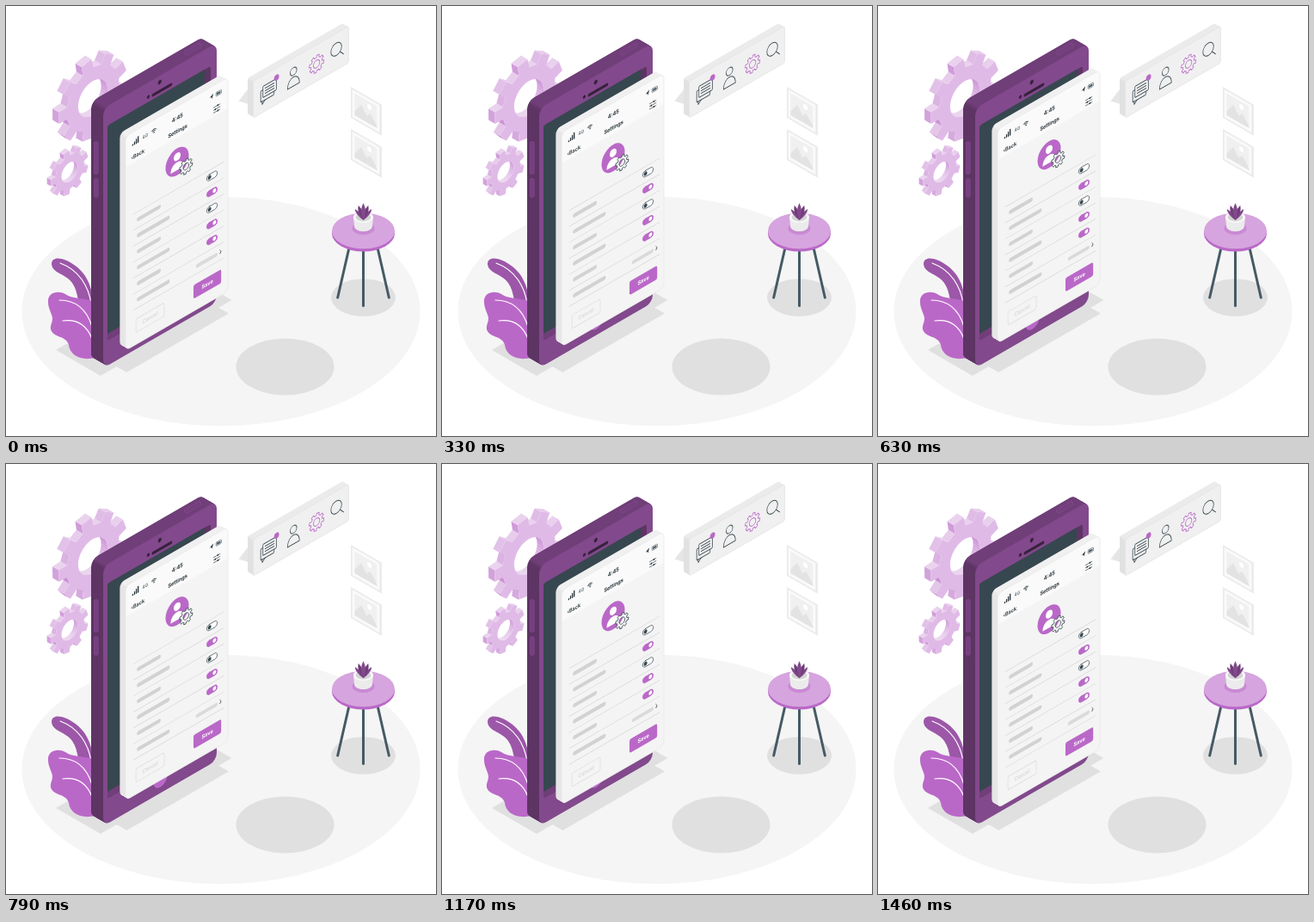
An HTML page with a canvas for the animation above (1500 ms loop, 500 by 500 pixels).

```html
<!DOCTYPE html>
<html lang="en">
<head>
<meta charset="utf-8">
<title>Phone settings</title>
<style>
  html, body { margin: 0; width: 100%; height: 100%; overflow: hidden; background: #fff; }
  canvas { display: block; width: 100vw; height: 100vh; }
</style>
</head>
<body>
<canvas id="stage" width="500" height="500"></canvas>
<script>
const ctx = document.getElementById('stage').getContext('2d');
const LOOP = 1500, LIFT = 10, TAU = Math.PI * 2;
const COS = Math.cos(Math.PI / 6), SLOPE = Math.tan(Math.PI / 6);
const PURPLE = '#ba68c8', FRONT = '#82498c', TOP = '#703e78', SIDE = '#5d3464';
const INK = '#263238', SLATE = '#37474f', GREY = '#e0e0e0';
const FONT = 'Inter, "Open Sans", sans-serif';
const range = n => [...Array(n).keys()];

// Isometric planes: a wall rises (-1) or falls (1) to the right.
function plane(a, b, c, d, x, y, draw) {
  ctx.save();
  ctx.transform(a, b, c, d, x, y);
  draw();
  ctx.restore();
}
const wall = (x, y, dir, draw) => plane(COS, dir / 2, 0, 1, x, y, draw);
const ground = (x, y, draw) => plane(COS, -0.5, COS, 0.5, x, y, draw);

function fill(color, path, rule = 'nonzero') {
  ctx.beginPath();
  path();
  ctx.fillStyle = color;
  ctx.fill(rule);
}

function stroke(color, width, path) {
  ctx.beginPath();
  path();
  ctx.strokeStyle = color;
  ctx.lineWidth = width;
  ctx.lineCap = ctx.lineJoin = 'round';
  ctx.stroke();
}

const line = (...pts) => () => pts.forEach(([x, y], i) => i ? ctx.lineTo(x, y) : ctx.moveTo(x, y));
const poly = (...pts) => () => { line(...pts)(); ctx.closePath(); };
const oval = (x, y, rx, ry = rx) => () => ctx.ellipse(x, y, rx, ry, 0, 0, TAU);
const box = (x, y, w, h, r = 0) => () => ctx.roundRect(x, y, w, h, r);
const dome = (x, y, w, h) => () => {
  ctx.moveTo(x - w, y);
  ctx.bezierCurveTo(x - w, y - h, x + w, y - h, x + w, y);
  ctx.closePath();
};
const shape = (color, d) => { ctx.fillStyle = color; ctx.fill(new Path2D(d)); };
const vein = d => {
  ctx.strokeStyle = '#fff';
  ctx.lineWidth = 1.2;
  ctx.lineCap = 'round';
  ctx.stroke(new Path2D(d));
};

function text(str, x, y, size, color, weight = 700) {
  ctx.font = `${weight} ${size}px ${FONT}`;
  ctx.textAlign = 'center';
  ctx.textBaseline = 'middle';
  ctx.fillStyle = color;
  ctx.fillText(str, x, y);
}

// A rounded slab standing on a rising wall, seen from its left.
function slab(x, y, w, h, r, depth, colors, drawFace) {
  const shade = ctx.createLinearGradient(0, 0, r, 0);
  shade.addColorStop(0.2, colors.side);
  shade.addColorStop(0.5, colors.top);
  for (let d = depth; d > 0; d -= 0.5) {
    wall(x - d, y - d * SLOPE, -1, () => fill(shade, box(0, 0, w, h, r)));
  }
  wall(x, y, -1, () => {
    fill(colors.face, box(0, 0, w, h, r));
    drawFace(box(0, 0, w, h, r));
  });
}

const polar = (x, y, r, a) => [x + r * Math.cos(a), y + r * Math.sin(a)];
const ring = (x, y, r) => range(40).map(i => polar(x, y, r, -i * TAU / 40));

function cog(x, y, r, teeth, phase) {
  const step = TAU / teeth;
  return range(teeth).flatMap(i => [-0.29, -0.21, 0.21, 0.29].map(k =>
    polar(x, y, Math.abs(k) > 0.25 ? r * 0.77 : r, phase + (i + k) * step)));
}

const cogPath = (x, y, r, teeth = 8, phase = 0.2) => () => {
  poly(...cog(x, y, r, teeth, phase))();
  poly(...ring(x, y, r * 0.43))();
};

// Each visible rim facet is lighter the more it faces upwards.
function solidCog(x, y, r, depth, phase) {
  const back = depth / COS;
  wall(x, y, -1, () => {
    for (const rim of [cog(0, 0, r, 9, phase), ring(0, 0, r * 0.43)]) {
      rim.forEach(([x1, y1], i) => {
        const [x2, y2] = rim[(i + 1) % rim.length];
        const nx = y2 - y1, ny = x1 - x2;
        if (nx + ny >= 0) return;
        const light = 75 - 13 * ny / Math.hypot(nx, ny);
        const facet = poly([x1, y1], [x2, y2], [x2 - back, y2 - back], [x1 - back, y1 - back]);
        fill(`hsl(291 45% ${light}%)`, facet);
      });
    }
    fill('#e0bae7', cogPath(0, 0, r, 9, phase), 'evenodd');
  });
}

function floor() {
  fill('#f5f5f5', oval(250, 355, 231.5, 133.3));
  fill(GREY, oval(324.5, 419.5, 57, 33));
  fill(GREY, oval(415.5, 339, 37.5, 21.8));
  ground(58, 400, () => fill(GREY, box(0, 0, 176, 60)));
  ground(123, 416, () => fill(GREY, box(0, 0, 137, 20)));
}

function plant() {
  shape('#9c57a8', 'M102 375 C104 335 98 316 82 303 C66 291 53 291 53 300 C54 311 69 311 77 322 C85 333 83 350 92 372Z');
  vein('M63 299 C85 307 96 326 99 346');
  shape(PURPLE, 'M49 344 C48 333 61 330 69 335 C78 341 87 339 101 343 L104 409 C87 413 74 406 73 394 C70 383 55 386 52 376 C51 370 56 366 53 359 C51 353 49 350 49 344Z');
  vein('M62 342 C81 342 94 353 100 373');
  vein('M66 366 C82 364 94 371 100 387');
}

function phone() {
  slab(113, 119, 152.4, 302, 9, 14, { face: FRONT, side: SIDE, top: TOP }, () => {
    // The screen glass sits 8 units behind its frame
    const glass = (shift, r) => box(5.8 - shift, 23 - shift, 138.6, 250, r);
    ctx.save();
    ctx.beginPath();
    glass(0, 3)();
    ctx.clip();
    fill(SIDE, glass(0, 0));
    fill(TOP, poly([-10, 265], [136, 265], [145, 274], [-10, 274]));
    fill(SLATE, glass(8, 0));
    ctx.restore();
    fill(PURPLE, oval(76.8, 285.8, 9.3));
    stroke('#38213c', 3.4, line([67, 18], [91, 18]));
    fill('#38213c', oval(76, 7.5, 2.4));
    fill('#38213c', oval(60.6, 17, 1.9));
  });
  const slot = (...pts) => {
    stroke(FRONT, 5.5, line(...pts));
    stroke('#743f7d', 4, line(...pts));
  };
  slot([104.8, 160], [104.8, 193]);
  slot([104.8, 203], [104.8, 220]);
  slot([210, 54.5], [224.5, 46]);
}

function statusBar() {
  for (const i of range(4)) {
    const h = 2 + i * 1.9;
    fill(INK, box(9 + i * 2.4, 16 - h, 1.5, h, 0.4));
  }
  text('4G', 26.5, 13.3, 5.5, '#455a64', 500);
  fill(INK, oval(38.3, 14.6, 0.8));
  for (const r of [2.3, 4]) {
    stroke(INK, 0.8, () => ctx.arc(38.3, 14.6, r, -0.77 * Math.PI, -0.23 * Math.PI));
  }
  text('4:45', 69.6, 13.6, 6.5, INK);
  fill(INK, poly([112.8, 12], [118, 9.2], [116, 14.6], [115.2, 12.2]));
  stroke('#455a64', 0.6, box(121.4, 10, 7.4, 4.4, 1.2));
  fill('#455a64', box(122.4, 11, 5.2, 2.4, 0.5));
  text('‹Back', 16.6, 29.5, 6.3, INK, 600);
  text('Settings', 70, 29, 6.4, INK);
  for (const i of range(3)) {
    const y = 25.8 + i * 3.1;
    stroke(INK, 0.6, line([118.2, y], [126.8, y]));
    fill(INK, oval(i === 1 ? 120.5 : 124, y, 1));
  }
}

function avatar() {
  fill(PURPLE, oval(69.3, 64.3, 15.6));
  fill('#fff', oval(69.3, 58.4, 4.6));
  fill('#fff', dome(69.3, 74, 8.8, 12.5));
  const path = cogPath(81.2, 75.6, 8.8);
  fill('#f5f5f5', path, 'evenodd');
  stroke(SLATE, 0.8, path);
}

function toggle(y, on) {
  const pill = box(109, y - 3.5, 14.2, 7, 3.5);
  fill(on ? PURPLE : '#fff', pill);
  stroke(on ? PURPLE : SLATE, 0.7, pill);
  fill(on ? '#fff' : SLATE, oval(on ? 119.4 : 112.8, y, 2.3));
}

function rows() {
  for (const i of range(7)) {
    const y = 95.8 + i * 18.6;
    stroke('#dcdcdc', 0.9, line([10.4, y], [131.5, y]));
    if (i === 6) break;
    fill('#d2d2d2', box(15.3, y + 6.8, i % 2 ? 44 : 32, 4.6, 2));
    if (i < 5) toggle(y + 8.4, i % 2 || i === 4);
  }
  fill('#dadada', box(94.5, 196.6, 29, 4.4, 2));
  stroke(INK, 0.7, line([126.8, 195.8], [128.3, 197.8], [126.8, 199.8]));
  stroke('#dedede', 0.9, box(14, 219.5, 38, 15.6, 2));
  text('Cancel', 33, 227.4, 6.4, '#d4d4d4', 500);
  fill(PURPLE, box(91.2, 218.8, 37.2, 16, 2.2));
  text('Save', 109.8, 227, 6.4, '#fff');
}

function settingsPanel(lift) {
  const colors = { face: '#f4f4f4', side: '#e6e6e6', top: '#f0f0f0' };
  slab(139, 151.5 - lift, 137.4, 249, 6, 6.6, colors, face => {
    fill('#fafafa', box(0, 0, 137.4, 36, [6, 6, 0, 0]));
    stroke('#e9e9e9', 0.8, face);
    statusBar();
    avatar();
    rows();
  });
}

function menu() {
  fill('#e6e6e6', poly([270.5, 110.5], [281, 97], [288, 99], [288, 116]));
  const colors = { face: '#f0f0f0', side: GREY, top: '#ebebeb' };
  slab(287.5, 87.5, 128, 42.5, 2, 6.3, colors, face => {
    stroke('#e4e4e4', 0.8, face);
    for (const i of [1, 0]) {
      const bubble = box(13 - i * 3, 12.5 + i * 4, 18, 13, 1);
      fill(colors.face, bubble);
      stroke(SLATE, 0.9, bubble);
    }
    for (const i of range(3)) stroke(SLATE, 0.9, line([16, 16 + i * 3], [28, 16 + i * 3]));
    stroke(SLATE, 0.9, line([12, 29.5], [12, 33], [16, 29.5]));
    fill(PURPLE, oval(31.3, 11.3, 3.4));
    stroke(SLATE, 0.9, oval(54, 15.5, 4.4));
    stroke(SLATE, 0.9, dome(54, 32.5, 8, 14));
    stroke(PURPLE, 0.9, cogPath(85, 22.4, 10));
    stroke(SLATE, 0.9, oval(111.5, 18.5, 7.2));
    stroke(SLATE, 0.9, line([116.5, 23.7], [121.3, 29]));
  });
}

function picture(y) {
  wall(401, y, 1, () => {
    fill('#ebebeb', box(0, 0, 41.5, 36));
    fill('#fafafa', box(2, 2, 36.5, 32));
    fill('#f0f0f0', box(5, 5, 30, 25.5));
    fill('#e3e3e3', poly([5, 30.5], [5, 26], [14, 14], [21, 23], [26, 18], [35, 28], [35, 30.5]));
    fill('#fff', oval(25, 11, 3));
  });
}

function table() {
  const x = 415.5;
  for (const k of [-1, 0, 1]) {
    const rise = Math.abs(k);
    stroke('#455a64', 3, line([x + 16.5 * k, 284 - 3 * rise], [x + 29.8 * k, 348.5 - 9.5 * rise]));
  }
  fill(PURPLE, oval(x, 264.5, 36.5, 21));
  fill('#d6a4de', oval(x, 261.5, 36.5, 20.8));
  fill('#c98ad3', oval(x, 258.5, 13, 7.5));

  shape('#ebebeb', 'M404 245 L405 256 C406 264 425 264 426 256 L427 245Z');
  fill('#fafafa', oval(x, 245.5, 11.5, 6.3));
  fill('#d5d5d5', oval(x, 245.8, 9, 4.7));
  for (const k of [-2, 2, -1, 1, 0]) {
    const [tipX, tipY] = polar(x, 248, 19 - Math.abs(k) * 1.8, -TAU / 4 + k * 0.34);
    const midX = (x + tipX) / 2, midY = (248 + tipY) / 2;
    shape(k % 2 ? TOP : FRONT, `M${x} 249 Q${midX - 5} ${midY} ${tipX} ${tipY} Q${midX + 5} ${midY} ${x} 249Z`);
  }
}

function draw(now) {
  const t = (now % LOOP) / LOOP;
  const lift = LIFT * (1 - Math.abs(1 - 2 * t));
  ctx.fillStyle = '#fff';
  ctx.fillRect(0, 0, 500, 500);
  floor();
  solidCog(101, 107, 46, 7.5, -0.36);
  solidCog(74, 193, 25.5, 4.5, -0.36);
  plant();
  phone();
  settingsPanel(lift);
  menu();
  picture(94);
  picture(143);
  table();
}

let start;
function frame(now) {
  start ??= now;
  draw(now - start);
  requestAnimationFrame(frame);
}
draw(0);
requestAnimationFrame(frame);
</script>
</body>
</html>
```
